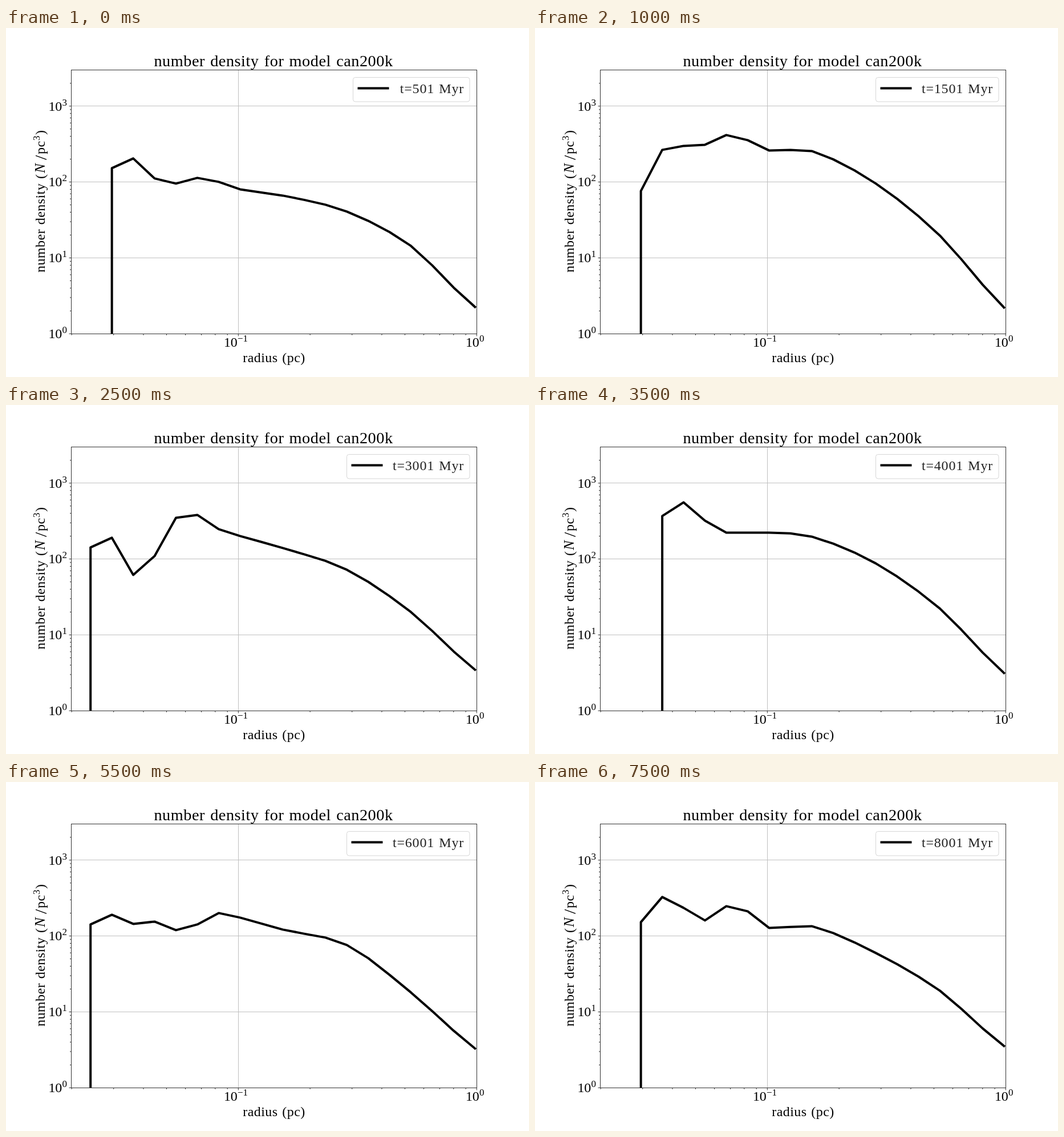
Animation, 917 px wide and 611 px high, one loop 8000 ms. Source, as an HTML page:

```html
<!DOCTYPE html>
<html lang="en">
<head>
<meta charset="utf-8">
<title>Number density</title>
<style>
  html, body { margin: 0; width: 100%; height: 100%; overflow: hidden; background: #fff; }
  svg { display: block; }
  text { font: 24px "Liberation Serif", serif; letter-spacing: .018em; word-spacing: .06em; }
  text.title { font-size: 28.3px; }
  text.sup { font-size: 17px; letter-spacing: 0; }
  text.num { letter-spacing: -.01em; }
  #label { letter-spacing: .8px; fill: #222; }
  .frame { fill: none; stroke: #333; shape-rendering: crispEdges; }
  #grid { stroke: #c0c0c0; shape-rendering: crispEdges; }
  .curve { fill: none; stroke: #000; stroke-width: 4; stroke-linejoin: round; }
</style>
</head>
<body>
<svg width="917" height="611" viewBox="0 0 917 611">
  <clipPath id="plot"><rect x="115" y="74" width="710" height="461"/></clipPath>
  <path id="grid" d="M407.5 73V535M115 136.5H825M115 269.5H825M115 402.5H825"/>
  <path id="curve" class="curve" stroke-linecap="square" clip-path="url(#plot)"/>
  <path id="ticks" stroke="#000" stroke-width=".8"/>
  <rect class="frame" x="114.5" y="73.5" width="711" height="462"/>
  <text class="title" x="469" y="67" text-anchor="middle">number density for model can200k</text>
  <text x="470" y="585" text-anchor="middle">radius (pc)</text>
  <g transform="translate(68 428) rotate(-90)">
    <text>number density</text>
    <text x="164">(</text>
    <text x="174" style="font-style:italic; font-size:25px">N</text>
    <text x="197" y="3" style="font-size:30px">/</text>
    <text x="207">pc</text>
    <text class="sup" x="231" y="-9">3</text>
    <text x="241">)</text>
  </g>
  <g id="powers"></g>
  <rect id="box" y="86.5" height="42.5" rx="4" fill="#fff" fill-opacity=".8" stroke="#ccc" stroke-opacity=".8"/>
  <path id="sample" class="curve"/>
  <text id="label" x="803" y="114" text-anchor="end"></text>
</svg>
<script>
const $ = id => document.getElementById(id);
const STEP = 500, COUNT = 16, LAST = 19;

// Bins where a profile is given; a spline fills the smooth outer part
const knots = [0, 1, 2, 3, 4, 5, 6, 7, 8, 10, 13, 16, 18];
const firstBin = '2120212313212022';   // innermost occupied bin of each step

// Key points of a few steps, from the innermost occupied bin outwards
const profiles = {
  0: [245, 228, 263, 272, 262, 269, 282, 293, 321, 381, 454],
  2: [285, 213, 206, 204, 187, 196, 214, 215, 272, 363, 449],
  5: [249, 232, 297, 264, 197, 192, 217, 229, 250, 288, 362, 431],
  7: [194, 170, 202, 223, 223, 223, 230, 277, 356, 433],
  9: [228, 211, 246, 241, 227, 230, 241, 275, 364, 438],
  11: [249, 232, 248, 244, 259, 249, 229, 237, 258, 285, 368, 435],
  15: [245, 201, 220, 242, 217, 226, 255, 252, 299, 365, 431]
};
const steps = Object.keys(profiles).map(Number);

// Bins without data take the density of a single star
const oneStar = bin => 213 + 36 * bin;

function points(step) {
  const ys = profiles[step], pad = knots.length - ys.length;
  const pts = knots.map((bin, i) => [bin, i < pad ? oneStar(bin) : ys[i - pad] + .4]);
  const [[, y0], , [, y1]] = pts.slice(-3);
  const [, ySlope] = pts.at(-2);
  pts.push([LAST, y1 + .465 * (y1 - ySlope)]);
  return pts;
}

// Cubic Hermite spline with tangents from the neighbouring points
function spline(pts, x) {
  const i = Math.max(0, pts.findIndex(p => p[0] >= x) - 1);
  const slope = j => {
    const a = pts[Math.max(0, j - 1)], b = pts[Math.min(pts.length - 1, j + 1)];
    return (b[1] - a[1]) / (b[0] - a[0]);
  };
  const [x0, y0] = pts[i], [x1, y1] = pts[i + 1];
  const w = x1 - x0, t = (x - x0) / w, u = 1 - t;
  return u * u * (1 + 2 * t) * y0 + t * t * (3 - 2 * t) * y1
    + t * u * w * (u * slope(i) - t * slope(i + 1));
}

function curvePath(step) {
  const from = steps.filter(s => s <= step).pop();
  const to = steps.find(s => s >= step);
  const mix = (step - from) / (to - from || 1);
  const a = points(from), b = points(to);
  let d = '';
  for (let bin = +firstBin[step]; bin <= LAST; bin++) {
    const x = 110.75 + 37.45 * bin;
    const y = spline(a, bin) * (1 - mix) + spline(b, bin) * mix;
    d += (d ? 'L' : `M${x} 560L`) + `${x} ${y}`;
  }
  return d;
}

function drawAxes() {
  let ticks = '', powers = '';
  const power = (x, y, exp) => powers +=
    `<text class="num" x="${x}" y="${y}">10</text><text class="sup" x="${x + 24}" y="${y - 9}">${exp}</text>`;
  for (let decade = 0; decade < 4; decade++) {
    for (let n = 1; n < 10; n++) {
      const size = n === 1 ? 3.5 : 2;
      const x = 825.3 + 418 * (Math.log10(n) - decade);
      const y = 535.3 - 132.83 * (Math.log10(n) + decade);
      if (x > 114 && x < 826) ticks += `M${x} 536v${size}`;
      if (y > 74) ticks += `M114 ${y}h${-size}`;
    }
    power(74.5, 543 - 132.83 * decade, decade);
  }
  power(382, 558, '−1');
  power(806, 558, 0);
  $('ticks').setAttribute('d', ticks);
  $('powers').innerHTML = powers;
}

let shown = -1;
function draw() {
  const step = Math.floor(performance.now() / STEP) % COUNT;
  if (step !== shown) {
    shown = step;
    const time = 501 + 500 * step;
    const left = time < 1000 ? 608.5 : 597.5;
    $('curve').setAttribute('d', curvePath(step));
    $('box').setAttribute('x', left);
    $('box').setAttribute('width', 813 - left);
    $('sample').setAttribute('d', `M${left + 8} 105.5h55`);
    $('label').textContent = `t=${time} Myr`;
  }
  requestAnimationFrame(draw);
}

drawAxes();
draw();
</script>
</body>
</html>
```
